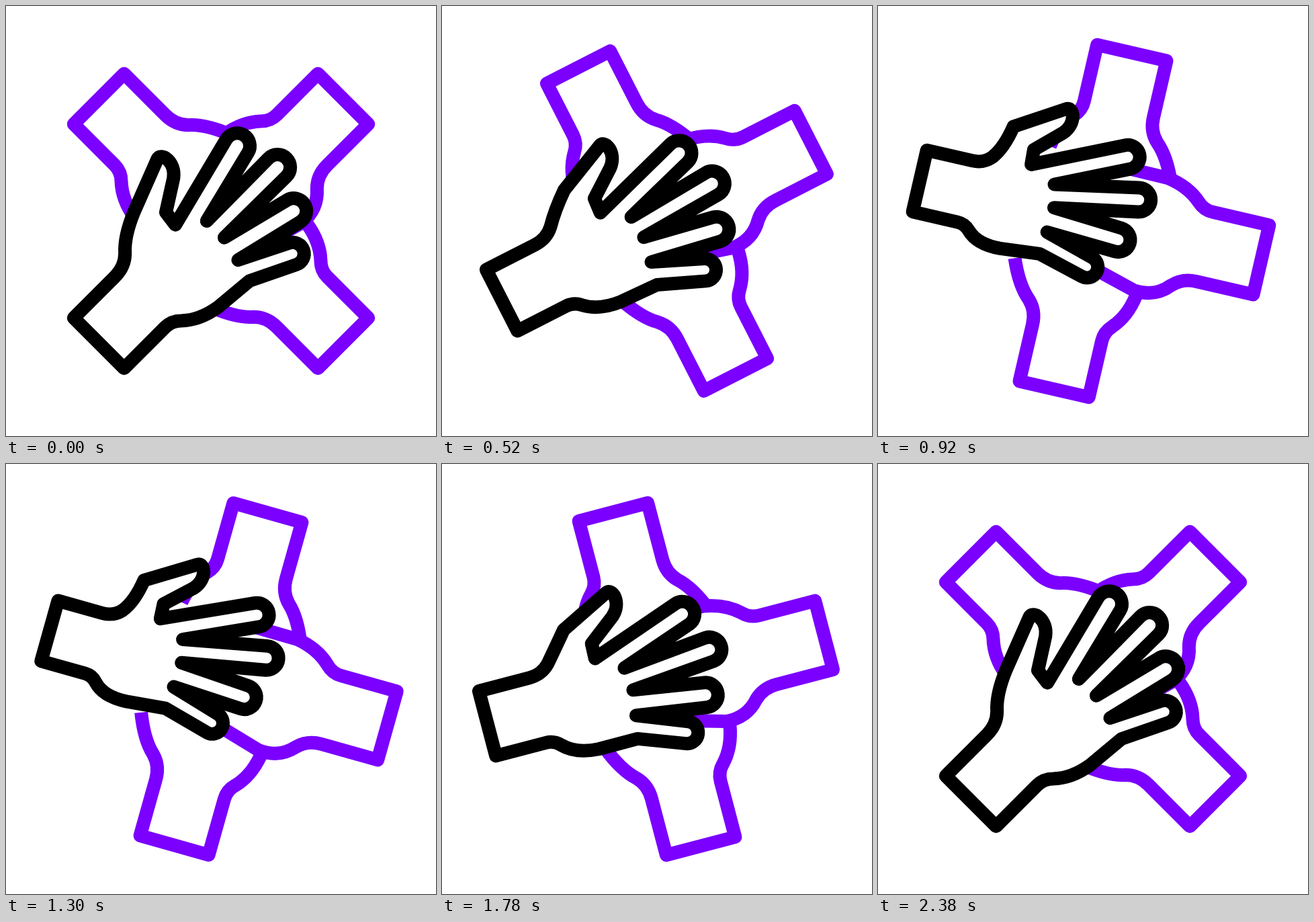
These frames come from a looping animation (640 px wide and 640 px high, 2400 ms). An HTML page with a canvas:

```html
<!DOCTYPE html>
<html>
<head>
<meta charset="utf-8">
<style>
  html, body { margin: 0; width: 100%; height: 100%; overflow: hidden; background: #fff; }
  canvas { display: block; }
</style>
</head>
<body>
<canvas id="stage" width="640" height="640"></canvas>
<script>
const ctx = document.getElementById('stage').getContext('2d');
const PURPLE = '#7b00ff', LOOP = 2400, DEG = Math.PI / 180, TURN = 61 * DEG;

// Each hand lies along its own x axis, fingers towards +x, with the stage centre as origin.
const fingers = [
  { tip: [96, -62], valley: [-15, -15], r: 19 },
  { tip: [116, 3], valley: [-14, 21], r: 19 },
  { tip: [87, 66], valley: [-23, 59], r: 19 },
  { tip: [41, 110], valley: [-33, 93], r: 17 }
];

const lerp = (a, b, k) => a + (b - a) * k;
const span = (t, from, to) => Math.min(1, Math.max(0, (t - from) / (to - from)));

// cubic-bezier(.72, 0, .28, 1)
function ease(x) {
  let lo = 0, hi = 1;
  for (let i = 0; i < 24; i++) {
    const s = (lo + hi) / 2, r = 1 - s;
    if (2.16 * r * r * s + 0.84 * r * s * s + s ** 3 < x) lo = s; else hi = s;
  }
  return lo * lo * (3 - 2 * lo);
}

// As k grows, the sleeve narrows and the hand bends at the wrist.
const sleeve = k => (x, y) => [lerp(x, 0.79 * x - 62, k), y * lerp(1, 0.88, k)];
function bend(k) {
  const c = lerp(1, 0.965 * Math.cos(11 * DEG), k), s = 0.965 * Math.sin(11 * DEG) * k;
  return (x, y) => {
    x += 15; y += 15;
    return [x * c + y * s - 15 - 56 * k, y * c - x * s - 15 - 26.5 * k];
  };
}

const line = p => ctx.lineTo(...p);
const quad = (a, b) => ctx.quadraticCurveTo(...a, ...b);

// Open outline from the little finger's side of the palm round the sleeve to the thumb's wrist.
function tracePalm(arm, hand) {
  ctx.moveTo(...hand(-94, 87.5));
  quad(arm(-127, 82), arm(-147, 63));
  quad(arm(-157, 53), arm(-171, 53));
  line(arm(-257, 53));
  line(arm(-257, -53));
  line(arm(-170, -53));
  quad(arm(-149, -53), arm(-135, -67));
}

// Line from a around a fingertip circle, then on to b.
function traceFinger(a, tip, b, r) {
  const side = p => {
    const dx = p[0] - tip[0], dy = p[1] - tip[1];
    return [Math.atan2(dy, dx), Math.acos(r / Math.hypot(dx, dy))];
  };
  const [a1, o1] = side(a), [a2, o2] = side(b);
  ctx.arc(...tip, r, a1 + o1, a2 - o2);
  line(b);
}

function drawHand(quarter, color, trace) {
  ctx.save();
  ctx.rotate((quarter * 90 - 45) * DEG);
  ctx.beginPath();
  trace();
  ctx.fill();
  ctx.strokeStyle = color;
  ctx.stroke();
  ctx.restore();
}

function traceSide() {
  tracePalm(sleeve(0), bend(0));
  ctx.quadraticCurveTo(-118, -86, -80, -101);
}

function traceFar(k) {
  ctx.moveTo(lerp(-90, -25, k), 88);
  ctx.lineTo(-94, 87.5);
  tracePalm(sleeve(0), bend(0));
  ctx.quadraticCurveTo(-115, -90, -83, -87);
  ctx.lineTo(-8, -66);
}

function traceTop(k) {
  const arm = sleeve(k), hand = bend(k);
  tracePalm(arm, hand);
  quad(arm(-118, -86), hand(-82, -101));
  line(hand(-2, -132));
  ctx.bezierCurveTo(...hand(10, -136), ...hand(15, -110), ...hand(-5, -95));
  line(hand(-49, -67));
  let base = hand(-52, -44);
  line(base);
  for (const { tip, valley, r } of fingers) {
    const next = hand(...valley);
    traceFinger(base, hand(...tip), next, r - k);
    base = next;
  }
  ctx.closePath();
}

function drawSparks(t) {
  const head = 1 - (1 - span(t, 1930, 2160)) ** 2, tail = span(t, 2100, 2360) ** 2;
  if (head <= 0 || tail >= 1) return;
  ctx.save();
  ctx.translate(350, 163);
  ctx.rotate(-94.5 * DEG);
  ctx.strokeStyle = PURPLE;
  ctx.lineCap = 'round';
  ctx.beginPath();
  for (const i of [-1, 0, 1]) {
    const x = Math.cos(39 * i * DEG), y = Math.sin(39 * i * DEG);
    for (const [d, go] of [[tail, 'moveTo'], [head, 'lineTo']]) {
      const r = lerp(27, 93, d);
      ctx[go](x * r, y * r);
    }
  }
  ctx.stroke();
  ctx.restore();
}

function draw(now) {
  const t = now % LOOP;
  const k = ease(t < 1200 ? t / 1200 : 1 - span(t, 1200, 2360));
  ctx.fillStyle = '#fff';
  ctx.fillRect(0, 0, 640, 640);
  ctx.lineWidth = 20;
  ctx.lineJoin = 'round';
  ctx.save();
  ctx.translate(320, 320);
  ctx.rotate(TURN * k);
  drawHand(1, PURPLE, traceSide);
  drawHand(3, PURPLE, traceSide);
  drawHand(2, PURPLE, () => traceFar(k));
  drawHand(0, '#000', () => traceTop(k));
  ctx.restore();
  drawSparks(t);
  requestAnimationFrame(draw);
}
requestAnimationFrame(draw);
</script>
</body>
</html>
```
